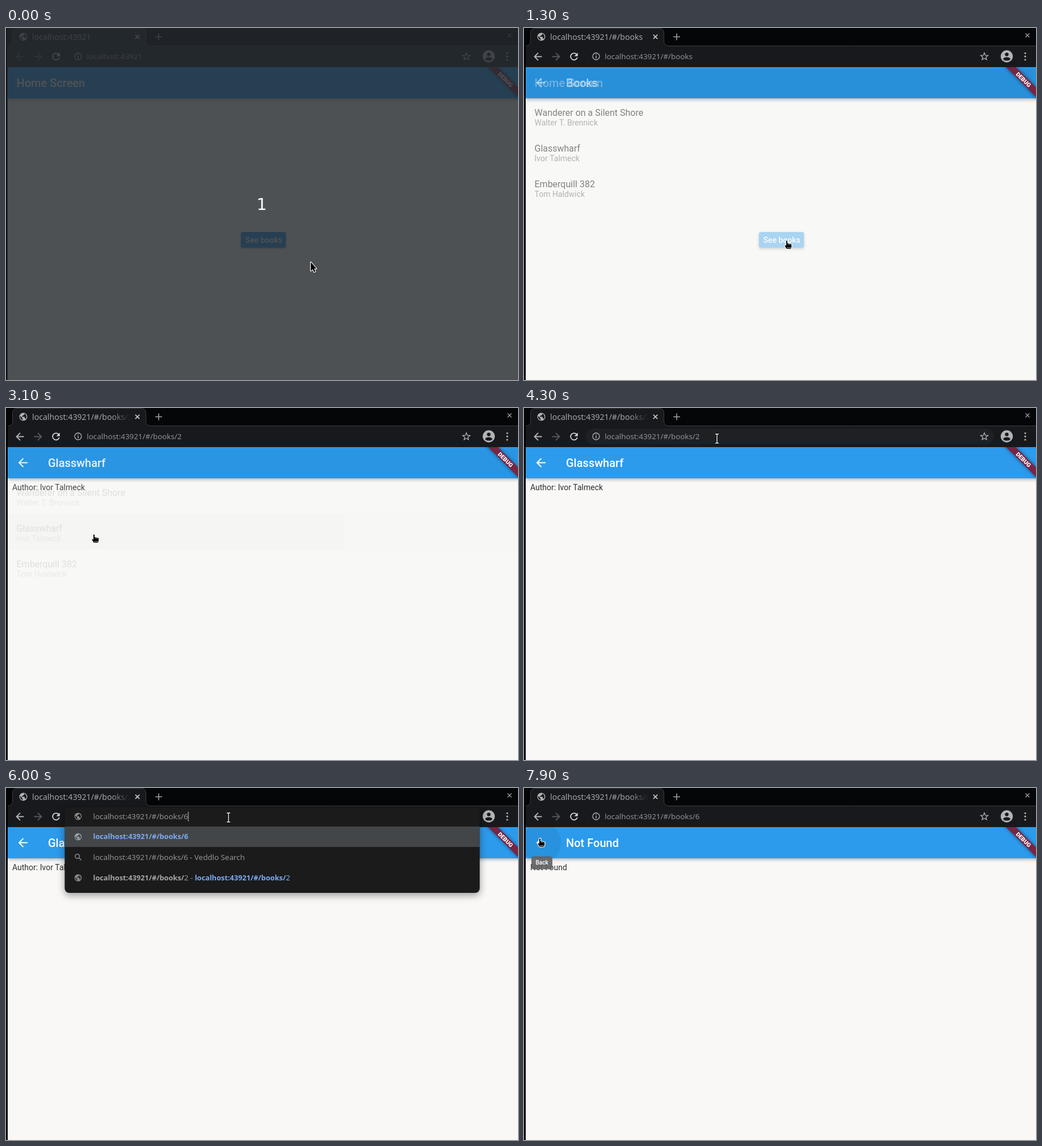
Recreate the animation shown at these times as an HTML page with a canvas. Size 902 by 621 pixels, loop 8000 ms.

```html
<!DOCTYPE html>
<html lang="en">
<head>
<meta charset="utf-8">
<title>Book router demo</title>
<style>
  html, body { margin: 0; width: 100%; height: 100%; overflow: hidden; background: #000; }
  canvas { display: block; }
</style>
</head>
<body>
<canvas id="stage" width="902" height="621"></canvas>
<script>
const ctx = document.getElementById('stage').getContext('2d');
const LOOP = 8000, TICK = 100;
const HOST = 'localhost:43921', LIST = HOST + '/#/books';
const TOOLBAR = '#18191c', PAPER = '#f9f8f7', BLUE = '#2c9bec', ICON = '#b2b3b5', DIM = '#56575a';
const UI = '"Noto Sans", sans-serif', APP = 'Roboto, sans-serif';

const books = [
  ['Wanderer on a Silent Shore', 'Walter T. Brennick'],
  ['Glasswharf', 'Ivor Talmeck'],
  ['Emberquill 382', 'Tom Haldwick'],
];

// Timelines: [start, value]
const urls = [[0, HOST], [1100, LIST], [3000, LIST + '/2'], [6100, LIST + '/6']];
const pages = [[0, home, 1], [1300, bookList, 400], [3100, details, 200], [6200, missing, 300]];
const cursors = [[0, arrow], [500, hand], [1600, arrow], [2200, hand], [3200, arrow],
  [4200, beam], [7500, arrow], [7700, hand]];
const route = [[200, 536, 412], [700, 463, 375], [1900, 463, 375], [2500, 155, 223],
  [3600, 155, 223], [3800, 239, 140], [3900, 239, 140], [4300, 340, 54], [4600, 392, 52],
  [7300, 392, 52], [7700, 28, 89]];

const clamp = x => Math.max(0, Math.min(1, x));
const indexAt = (list, t) => list.findLastIndex(item => item[0] <= t);
const at = (list, t) => list[indexAt(list, t)][1];

function pointer(t) {
  const i = indexAt(route, t);
  if (i < 0) return route[0].slice(1);
  const a = route[i], b = route[i + 1];
  if (!b) return a.slice(1);
  const k = (t - a[0]) / (b[0] - a[0]), e = k * k * (3 - 2 * k);
  return [a[1] + (b[1] - a[1]) * e, a[2] + (b[2] - a[2]) * e];
}

// Drawing helpers
function rect(x, y, w, h, color, radius = 0) {
  ctx.fillStyle = color;
  ctx.beginPath();
  ctx.roundRect(x, y, w, h, radius);
  ctx.fill();
}
function disc(x, y, r, color, ry = r) {
  ctx.fillStyle = color;
  ctx.beginPath();
  ctx.ellipse(x, y, r, ry, 0, 0, 7);
  ctx.fill();
}
function fill(path, color) {
  ctx.fillStyle = color;
  ctx.fill(new Path2D(path));
}
function stroke(path, color, width = 1.6) {
  ctx.strokeStyle = color;
  ctx.lineWidth = width;
  ctx.stroke(new Path2D(path));
}
function text(str, x, y, font, color) {
  ctx.font = font;
  ctx.fillStyle = color;
  ctx.fillText(str, x, y);
  return x + ctx.measureText(str).width;
}
function shadow(color, blur, dy, draw) {
  ctx.save();
  ctx.shadowColor = color;
  ctx.shadowBlur = blur;
  ctx.shadowOffsetY = dy;
  draw();
  ctx.restore();
}
function placed(x, y, draw) {
  ctx.save();
  ctx.translate(x, y);
  draw();
  ctx.restore();
}
function clipped(x, y, w, h, draw) {
  ctx.save();
  ctx.beginPath();
  ctx.rect(x, y, w, h);
  ctx.clip();
  draw();
  ctx.restore();
}

// Icons
function globe(x, y, size, color, hole) {
  placed(x, y, () => {
    ctx.scale(size / 7, size / 7);
    disc(0, 0, 7, color);
    fill('M-5.6-1.5L-2 2V3.2L-.7 4.5V5.6C-4 5-6.2 2-5.6-1.5Z', hole);
    fill('M1.5-5.4C4-4.5 5.6-2.5 5.6 0C5.6 1.5 5 3 4.2 3.8C4 3 3.4 2.7 2.5 2.7V.7L1.8 0H-2.3V-1.4H-.8V-2.8H.7L1.5-3.8Z', hole);
  });
}
const cross = (x, y, r, color, width) =>
  stroke(`M${x - r} ${y - r}l${2 * r} ${2 * r}m0 ${-2 * r}l${-2 * r} ${2 * r}`, color, width);
const backArrow = (x, y, r, color, width) =>
  stroke(`M${x + r} ${y}H${x - r + 1}M${x} ${y - r}L${x - r} ${y}L${x} ${y + r}`, color, width);

function star(x, y) {
  let path = '';
  for (let i = 0; i < 10; i++) {
    const r = i % 2 ? 2.9 : 6.7, a = i * Math.PI / 5;
    path += (i ? 'L' : 'M') + (x + r * Math.sin(a)) + ' ' + (y - r * Math.cos(a));
  }
  stroke(path + 'Z', ICON, 1.3);
}

// Pointers, drawn from their hot spot
function outlined(path) {
  ctx.lineJoin = 'round';
  stroke(path, '#fff', 2.2);
  fill(path, '#000');
  ctx.lineJoin = 'miter';
}
function arrow() {
  outlined('M1 1V16.5L4.4 13.4L6.8 18.6L9 17.6L6.7 12.6H11Z');
}
function hand() {
  outlined('M-1 .5Q0-.5 1 .5V5L7 6Q8.2 6.3 8.2 7.5V11L7 14.5H-.5L-3.5 9.5Q-3.5 7.5-2 8.5L-1 9.2Z');
  stroke('M3.2 5.5V8M5.6 6V8.2M0 12.5H7', '#fff', .6);
}
function beam() {
  const path = 'M-3-8H-1Q0-8 0-7Q0-8 1-8H3M0-7V7M-3 8H-1Q0 8 0 7Q0 8 1 8H3';
  stroke(path, '#000', 3.4);
  stroke(path, '#fff', 1.4);
}

// App pages
function appPage(title, nested = true) {
  rect(3, 124, 899, 497, PAPER);
  shadow('rgba(0,0,0,.32)', 6, 2, () => rect(3, 69, 899, 55, BLUE));
  text(title, nested ? 74 : 18.5, 104, '500 20px ' + APP, '#fff');
  if (nested) backArrow(30.5, 96.5, 7.5, '#fff', 2);
}

function home(t) {
  appPage('Home Screen', false);
  const hover = t >= 500;
  shadow('rgba(0,0,0,.4)', hover ? 5 : 3, hover ? 2 : 1, () => rect(414, 360, 79, 27.5, BLUE, 3));
  if (hover) rect(414, 360, 79, 27.5, 'rgba(255,255,255,.08)', 3);
  text('See books', 421.5, 379, '500 14px ' + APP, '#fff');
}

function bookList(t) {
  appPage('Books');
  const [x, y] = pointer(t);
  const hovered = Math.floor((y - 124) / 63);
  if (t > 1600 && hovered < books.length) {
    const top = 124 + hovered * 63;
    rect(3, top, 899, 63, 'rgba(0,0,0,.04)');
    if (t >= 2800) clipped(3, top, 899, 63, () => disc(x, y, (t - 2700) * 1.1, 'rgba(0,0,0,.07)'));
  }
  books.forEach(([title, author], i) => {
    text(title, 18.5, 155 + i * 63, '16px ' + APP, '#2c2c2c');
    text(author, 18.5, 172 + i * 63, '14px ' + APP, '#808080');
  });
}

function details() {
  appPage(books[1][0]);
  text('Author: ' + books[1][1], 11, 144.5, '14px ' + APP, '#2f2f2f');
}

function missing(t) {
  appPage('Not Found');
  text('Not Found', 11, 144.5, '14px ' + APP, '#2f2f2f');
  if (t < 7700) return;
  const grow = clamp((t - 7600) / 200);
  clipped(3, 69, 899, 55, () => disc(30.5, 96.5, 35 * grow, 'rgba(0,0,0,.06)'));
  if (t < 7800) return;
  ctx.globalAlpha = t < 7900 ? .5 : 1;
  rect(13, 120.5, 37, 23, 'rgba(97,97,97,.9)', 4);
  text('Back', 20.5, 135, '500 10px ' + APP, '#fff');
  ctx.globalAlpha = 1;
}

function pageView(t) {
  const i = indexAt(pages, t), [start, page, duration] = pages[i];
  const fade = 1 - (1 - clamp((t - start + TICK) / duration)) ** 3;
  if (i && fade < 1) {
    pages[i - 1][1](t);
    ctx.globalAlpha = fade;
  }
  page(t);
  ctx.globalAlpha = 1;
}

function debugBanner() {
  clipped(3, 69, 899, 552, () => placed(902, 69, () => {
    ctx.rotate(Math.PI / 4);
    shadow('rgba(0,0,0,.5)', 6, 0, () => rect(-60, 25.2, 120, 12, '#792544'));
    ctx.textAlign = 'center';
    text('DEBUG', 0, 34.9, '900 10.2px ' + APP, '#fff');
    ctx.textAlign = 'left';
  }));
}

// Browser frame
function tabBar(t, url) {
  rect(0, 0, 902, 32, t < 900 ? '#000' : '#050608');
  rect(3, 32, 899, 37, TOOLBAR);
  const outline = 'M3 31.5Q11.5 31.5 11.5 23V9Q11.5 .5 20 .5H238Q246.5 .5 246.5 9V23Q246.5 31.5 255 31.5';
  fill(outline + 'V33H3Z', TOOLBAR);
  stroke(outline + 'H902', '#3b3c3f', 1);
  globe(30.5, 15.5, 7, ICON, TOOLBAR);
  const title = ctx.createLinearGradient(186, 0, 219, 0);
  title.addColorStop(0, '#a5a6a8');
  title.addColorStop(1, url.length > LIST.length ? 'rgba(165,166,168,0)' : '#a5a6a8');
  clipped(46, 0, 173, 31, () => text(url, 46, 20.5, '14.1px ' + UI, title));
  cross(231.5, 15.5, 3.7, '#c4c5c7', 1.7);
  stroke('M263 15.5H275M269 9.5V21.5', '#a5a6a8', 1.5);
  cross(887, 13, 3.5, t < 900 ? '#6e6e70' : '#a0a1a3', 1.3);
}

function toolbar(t, url) {
  const editing = t >= 4500 && t < 6100;
  const caret = t >= 4600 && t < 6100 && !(t >= 5100 && t < 5600);
  backArrow(25, 50.5, 6.5, t < 1100 ? DIM : ICON, 1.8);
  stroke('M49.5 50.5H62M56 44L62.5 50.5L56 57', DIM, 1.8);
  stroke('M92.6 46.3A6 6 0 1 0 93.9 52', '#d0d1d3', 1.8);
  fill('M94.8 43.5V49.7H88.6Z', '#d0d1d3');
  disc(850.5, 50, 10.7, ICON);
  disc(850.5, 46.6, 3.2, TOOLBAR);
  disc(850.5, 54.6, 6.2, TOOLBAR, 3);
  [44.5, 50.2, 56].forEach(y => disc(883, y, 1.6, ICON));

  if (t >= 5600 && t < 6100) return suggestions(t);
  if (editing || t >= 4200 && t < 4500) rect(108.5, 36, 720, 28, editing ? '#222326' : '#1f2023', 14);
  stroke('M133 50A6 6 0 1 1 121 50A6 6 0 1 1 133 50', ICON, 1.3);
  rect(126.3, 49, 1.5, 4.5, ICON);
  rect(126.3, 46.2, 1.5, 1.6, ICON);
  star(811, 50.5);
  if (t === 4500) rect(142, 41, 167, 19, '#35537f');
  const end = text(url, 142.3, 55, '13.35px ' + UI, '#909194');
  if (caret) rect(end + .5, 42, 1, 17, '#c8c9cb');
}

// Translucent while fading in, so its shadow is kept outside the panel
function suggestionPanel(alpha, color, selected) {
  const x = 103.5, w = 731;
  ctx.save();
  ctx.globalAlpha = alpha;
  rect(x, 34, w, 34, color, [8, 8, 0, 0]);
  rect(x, 68, w, 36, selected);
  rect(x, 104, w, 81, color, [0, 0, 8, 8]);
  ctx.beginPath();
  ctx.rect(0, 0, 902, 621);
  ctx.roundRect(x, 34, w, 151, 8);
  ctx.clip('evenodd');
  shadow('rgba(0,0,0,.4)', 14, 4, () => rect(x, 34, w, 151, color, 8));
  ctx.restore();
}

function suggestions(t) {
  const base = LIST + '/', typed = base + (t >= 6000 ? '6' : '');
  const plain = '13.35px ' + UI, bold = 'bold 12.75px ' + UI;
  const grey = '#929497', link = '#7cabf4', panel = '#1b1b1c', left = 153.5;
  suggestionPanel(t < 5700 ? .88 : 1, panel, '#434648');

  globe(127, 50, 6.3, '#8b8c8f', panel);
  const end = text(typed, left, 55, plain, grey);
  rect(end, 42, 1, 17, '#c8c9cb');

  globe(127, 86, 6.3, '#9a9ea2', '#40505c');
  text(typed, left, 90, bold, link);

  stroke('M129.5 120.5A3.8 3.8 0 1 1 121.9 120.5A3.8 3.8 0 1 1 129.5 120.5M128.6 123.4L132.5 127.3', '#8b8c8f', 1.5);
  text(typed + ' - Veddlo Search', left, 126.5, plain, grey);

  globe(127, 158.5, 6.3, '#8b8c8f', '#333');
  let x = text(base, left, 163, bold, '#a6a7a9');
  x = text('2 - ', x, 163, plain, grey);
  x = text(base, x, 163, bold, link);
  text('2', x, 163, plain, link);
}

function countdown() {
  rect(1, 0, 901, 621, 'rgba(38,43,48,.815)');
  text('1', 441.5, 321, '28.5px "DejaVu Sans", sans-serif', '#fff');
}

function draw(t) {
  const url = at(urls, t);
  rect(0, 0, 902, 621, '#000');
  pageView(t);
  debugBanner();
  tabBar(t, url);
  toolbar(t, url);
  if (t < 100) countdown();
  placed(...pointer(t), at(cursors, t));
}

let shown = -1;
function loop(now) {
  const t = Math.floor(now % LOOP / TICK) * TICK;
  if (t !== shown) draw(shown = t);
  requestAnimationFrame(loop);
}
draw(0);
requestAnimationFrame(loop);
</script>
</body>
</html>
```
